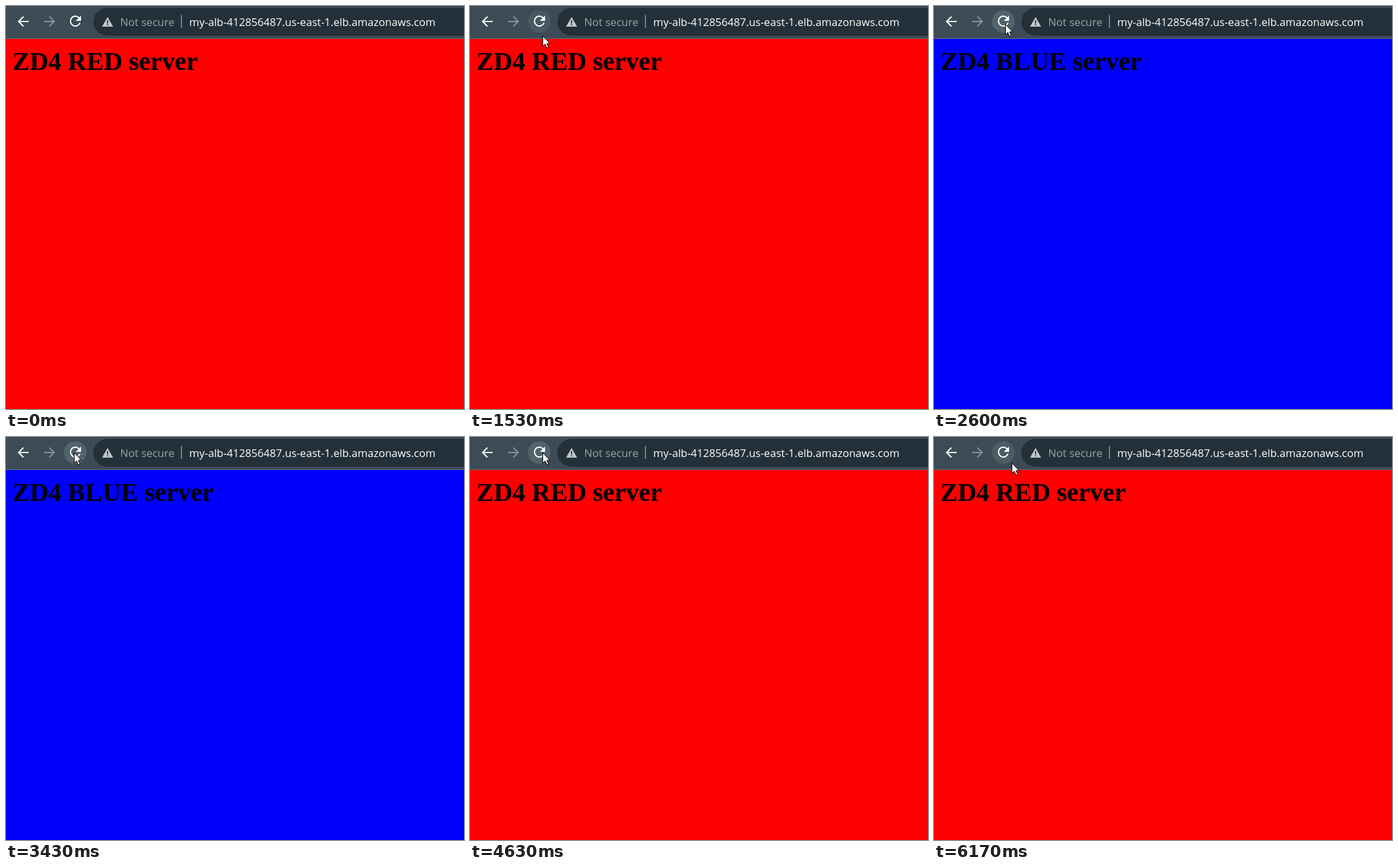
An HTML page that plays this animation: 708 px wide and 624 px high, repeating every 6210 ms.

```html
<!DOCTYPE html>
<html lang="en">
<head>
<meta charset="utf-8">
<title>Load balancer demo</title>
<style>
html, body { margin: 0; width: 100%; height: 100%; overflow: hidden; }
svg { display: block; width: 100vw; height: 100vh; }
.ui { font: 16.6px "Open Sans", "Noto Sans", sans-serif; }
.heading { font: bold 40px "Liberation Serif", "Times New Roman", serif; }
.icon { fill: none; stroke: #fff; stroke-width: 2; }
.dim { stroke: #87959a; }
</style>
</head>
<body>
<svg viewBox="0 0 708 624" preserveAspectRatio="none">
  <rect id="page" width="708" height="624"/>
  <text id="heading" class="heading" x="10" y="98.5"></text>

  <rect width="708" height="50" fill="#3c4b56"/>
  <rect y="50" width="708" height="1" fill="#62707a"/>
  <rect x="135" y="3" width="640" height="43" rx="21.5" fill="#243039"/>

  <path id="arrow" class="icon" d="M35 24H20M27 16.5 19.5 24 27 31.5"/>
  <path class="icon dim" d="M59 24H74M67 16.5 74.5 24 67 31.5"/>
  <circle id="hover" cx="107" cy="24" r="17.5" fill="#52646b"/>
  <path class="icon" d="M113 18.5A7.6 7.6 0 1 0 114.4 26"/>
  <path fill="#fff" d="M116 15V23H108Z"/>

  <path fill="#c1c9cc" d="M157 17 165.5 32H148.5Z"/>
  <path stroke="#243039" stroke-width="1.8" d="M157 22V27M157 28.3V30.2"/>
  <text class="ui" x="176.5" y="31" fill="#9aa4a8">Not secure</text>
  <rect x="270.5" y="14" width="1.5" height="20" fill="#87959a"/>
  <text class="ui" x="283.3" y="31" fill="#fff">my-alb-412856487.us-east-1.elb.amazonaws.com</text>

  <path id="cursor" d="M.5 .5V16.5L4.2 13 6.8 19 9.3 17.9 6.8 12H11.5Z"
        fill="#fff" stroke="#000"/>
</svg>
<script>
const LOOP = 6210, ENTER = 30, SETTLE = 140;
const RED = { color: "#f00", label: "ZD4 RED server" };
const BLUE = { color: "#00f", label: "ZD4 BLUE server" };

// Page loads: where the pointer rests, how far it dips afterwards, who answers
const visits = [
  { at: 0, x: 126, y: 76, dip: 0, server: RED },
  { at: 970, x: 112, y: 28, dip: 24, server: RED },
  { at: 2370, x: 111, y: 15, dip: 28, server: BLUE },
  { at: 3530, x: 105, y: 24, dip: 100, server: RED },
  { at: 4800, x: 112, y: 23, dip: 24, server: BLUE },
  { at: 5630, x: 114, y: 19, dip: 0, server: RED },
  { at: LOOP, x: 120, y: 40 }
];

const [page, heading, hover, cursor] =
  ["page", "heading", "hover", "cursor"].map(id => document.getElementById(id));

const clamp = u => Math.max(0, Math.min(1, u));
const ease = u => u * u * (3 - 2 * u);
const mix = (a, b, u) => a + (b - a) * u;

function draw(t) {
  const next = visits.findIndex(visit => visit.at > t);
  const from = visits[next - 1], to = visits[next];
  page.setAttribute("fill", from.server.color);
  heading.textContent = from.server.label;

  // Travel to the next resting place, then wait there for the load
  const u = clamp((t - from.at) / (to.at - from.at - SETTLE));
  const x = mix(from.x, to.x, ease(u));
  const y = mix(from.y, to.y, ease(u)) + from.dip * Math.sin(Math.PI * u) ** 2;
  const shown = t >= ENTER;
  cursor.setAttribute("visibility", shown ? "visible" : "hidden");
  cursor.setAttribute("transform", `translate(${Math.round(x)} ${Math.round(y)})`);

  const distance = Math.hypot(x - 107, y - 24);
  hover.setAttribute("opacity", shown ? clamp((30 - distance) / 14) : 0);
}

const begin = performance.now();
function tick() {
  draw((performance.now() - begin) % LOOP);
  requestAnimationFrame(tick);
}
tick();
</script>
</body>
</html>
```
